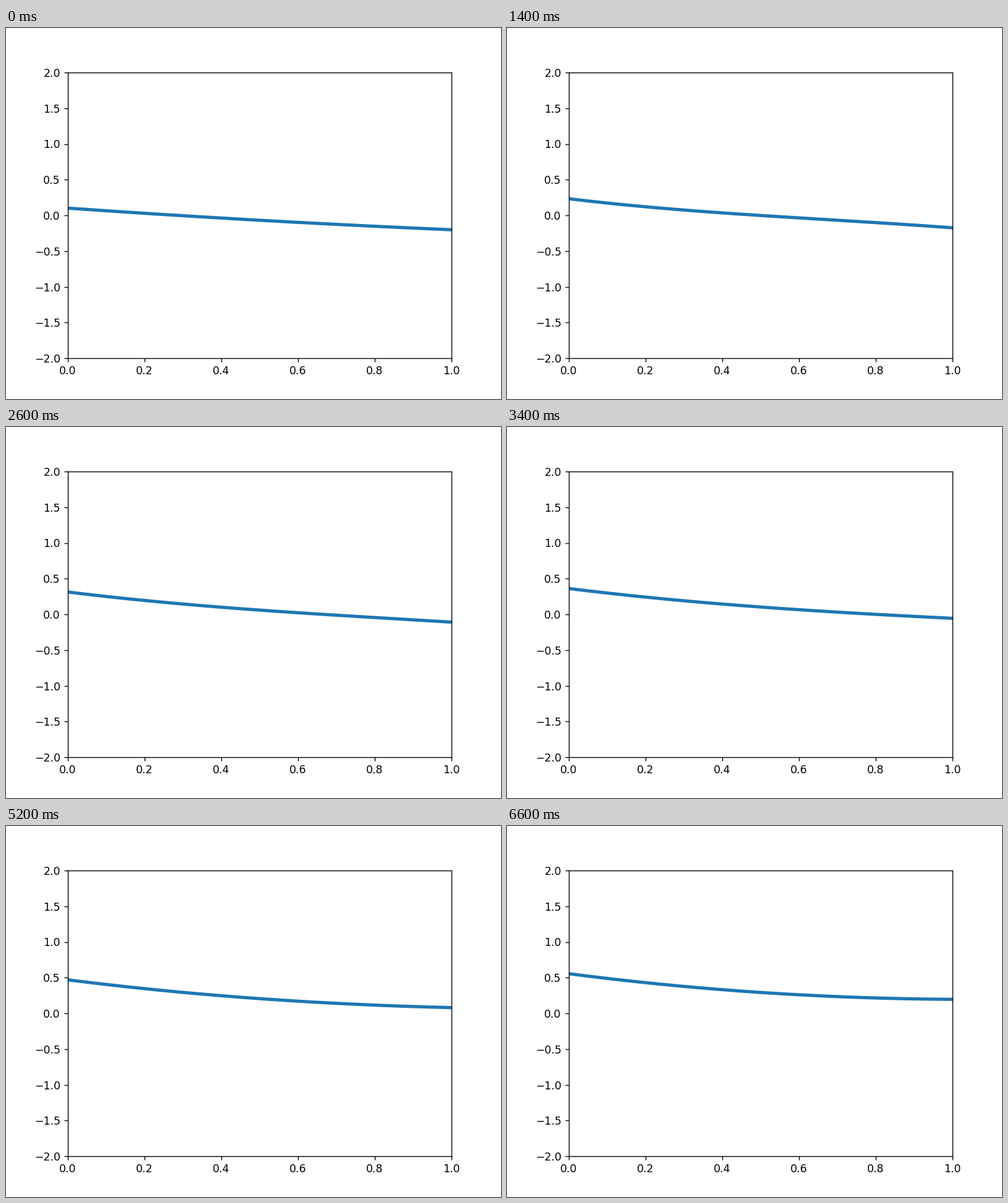
A matplotlib script for the animation above (6800 ms loop, 800 px wide and 600 px high).

```python
import matplotlib.pyplot as plt
import numpy as np
from matplotlib.animation import FuncAnimation

FRAMES = 34
INTERVAL = 200


def curve(x, t):
    """Cubic whose level, tilt, bend and twist settle into a steady drift."""
    u = 2 * x - 1
    fade = np.exp(-t / 8.2)
    level = -0.060 + 0.00998 * t + 0.000057 * t ** 2
    tilt = -0.262 + 0.00245 * t + 0.1107 * fade
    bend = 0.008 + 0.0011 * t + 0.002 * fade
    twist = -0.0029 * t * np.exp(-t / 5.5)
    return (level + tilt * u
            + bend * (1.875 * u ** 2 - 0.875)
            + twist * (5.208 * u ** 3 - 4.208 * u))


fig, ax = plt.subplots(figsize=(6.4, 4.8), dpi=125)
ax.set_xlim(0, 1)
ax.set_ylim(-2, 2)
x = np.linspace(0, 1, 200)
line, = ax.plot(x, curve(x, 0), color="#1f77b4", lw=3)


def update(frame):
    line.set_ydata(curve(x, frame))
    return line,


anim = FuncAnimation(fig, update, frames=FRAMES, interval=INTERVAL,
                     repeat=True, repeat_delay=0)
plt.show()
```
